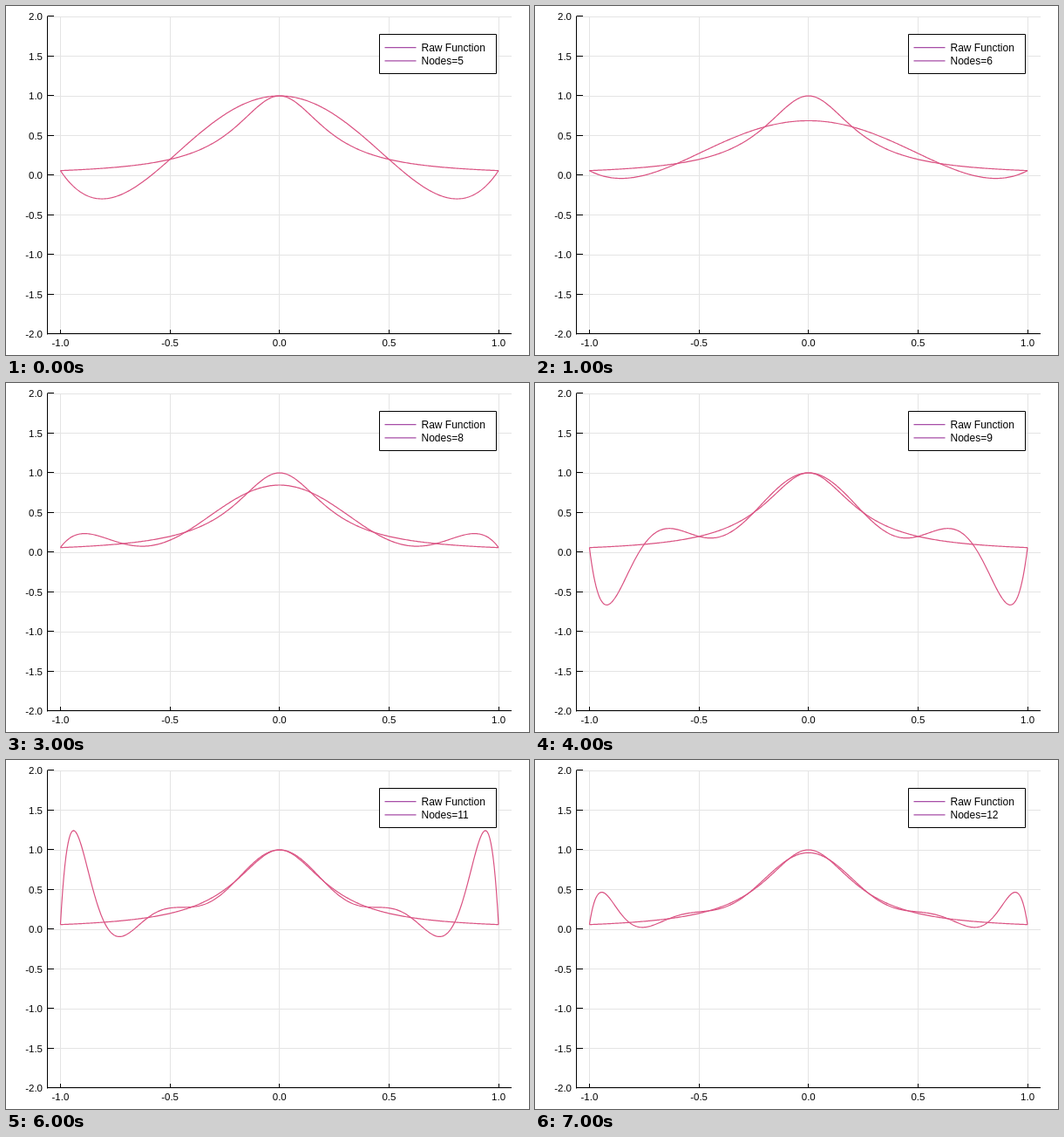
Write an HTML page with a canvas that moves like this. It is 600 px wide and 400 px high and loops after 8 s.

```html
<!DOCTYPE html>
<html lang="en">
<head>
<meta charset="utf-8">
<title>Polynomial interpolation</title>
<style>
  html, body { margin: 0; width: 100%; height: 100%; overflow: hidden; background: #fff; }
  canvas { display: block; }
</style>
</head>
<body>
<canvas id="stage" width="600" height="400"></canvas>
<script>
const ctx = document.getElementById('stage').getContext('2d');
const FIRST_NODES = 5, STEPS = 8, STEP_MS = 1000;
const LEFT = 47.5, RIGHT = 580, TOP = 12, BOTTOM = 376;
const CURVE = '#da5282', SAMPLE = '#a64ca6', GRID = '#e4e4e4';

const px = x => 313.75 + 251.3 * x;
const py = y => 194 - 91 * y;
const crisp = v => Math.floor(v) + 0.5;
const raw = x => 1 / (1 + 16 * x * x);

// Lagrange polynomial through evenly spaced nodes on [-1, 1]
function interpolant(count) {
  const nodes = Array.from({ length: count }, (_, i) => -1 + 2 * i / (count - 1));
  return x => nodes.reduce((sum, a) =>
    sum + nodes.reduce((term, b) => a === b ? term : term * (x - b) / (a - b), raw(a)), 0);
}

function line(x1, y1, x2, y2, color) {
  ctx.strokeStyle = color;
  ctx.beginPath();
  ctx.moveTo(x1, y1);
  ctx.lineTo(x2, y2);
  ctx.stroke();
}

function plot(fn) {
  ctx.strokeStyle = CURVE;
  ctx.lineWidth = 1.2;
  ctx.lineJoin = 'round';
  ctx.beginPath();
  for (let i = -200; i <= 200; i++) ctx.lineTo(px(i / 200), py(fn(i / 200)));
  ctx.stroke();
}

function text(label, x, y, align, size) {
  ctx.font = `${size}px "Liberation Sans", Arial, sans-serif`;
  ctx.textAlign = align;
  ctx.fillStyle = '#000';
  ctx.fillText(label, x, y);
}

function drawAxes() {
  const xs = [-1, -0.5, 0, 0.5, 1];
  const ys = Array.from({ length: 9 }, (_, i) => -2 + i / 2);
  ctx.lineWidth = 1;
  for (const x of xs) line(crisp(px(x)), TOP, crisp(px(x)), BOTTOM, GRID);
  for (const y of ys) line(LEFT, crisp(py(y)), RIGHT, crisp(py(y)), GRID);
  line(LEFT, TOP, LEFT, BOTTOM + 0.5, '#000');
  line(LEFT, crisp(BOTTOM - 0.5), RIGHT, crisp(BOTTOM - 0.5), '#000');
  for (const x of xs) {
    line(crisp(px(x)), BOTTOM - 5, crisp(px(x)), BOTTOM, '#000');
    text(x.toFixed(1), px(x), 390, 'center', 11.5);
  }
  for (const y of ys) {
    const ty = crisp(py(y) - 0.5);
    line(LEFT, ty, LEFT + 7.5, ty, '#000');
    text(y.toFixed(1), 42, Math.round(py(y)) + 4, 'right', 11.5);
  }
}

function drawLegend(count) {
  ctx.lineWidth = 1;
  ctx.fillStyle = '#fff';
  ctx.strokeStyle = '#000';
  ctx.fillRect(428.5, 32.5, 134, 45);
  ctx.strokeRect(428.5, 32.5, 134, 45);
  ['Raw Function', `Nodes=${count}`].forEach((label, i) => {
    const y = 47.7 + 15.2 * i;
    ctx.lineWidth = 1.3;
    line(434.5, y, 470.5, y, SAMPLE);
    text(label, 476.5, 52 + 15 * i, 'left', 12);
  });
}

function draw(count) {
  ctx.fillStyle = '#fff';
  ctx.fillRect(0, 0, 600, 400);
  drawAxes();
  plot(raw);
  plot(interpolant(count));
  drawLegend(count);
}

let shown = 0;
const start = performance.now();
function tick() {
  const elapsed = Math.max(0, performance.now() - start);
  const count = FIRST_NODES + Math.floor(elapsed / STEP_MS) % STEPS;
  if (count !== shown) draw(shown = count);
  requestAnimationFrame(tick);
}
tick();
</script>
</body>
</html>
```
